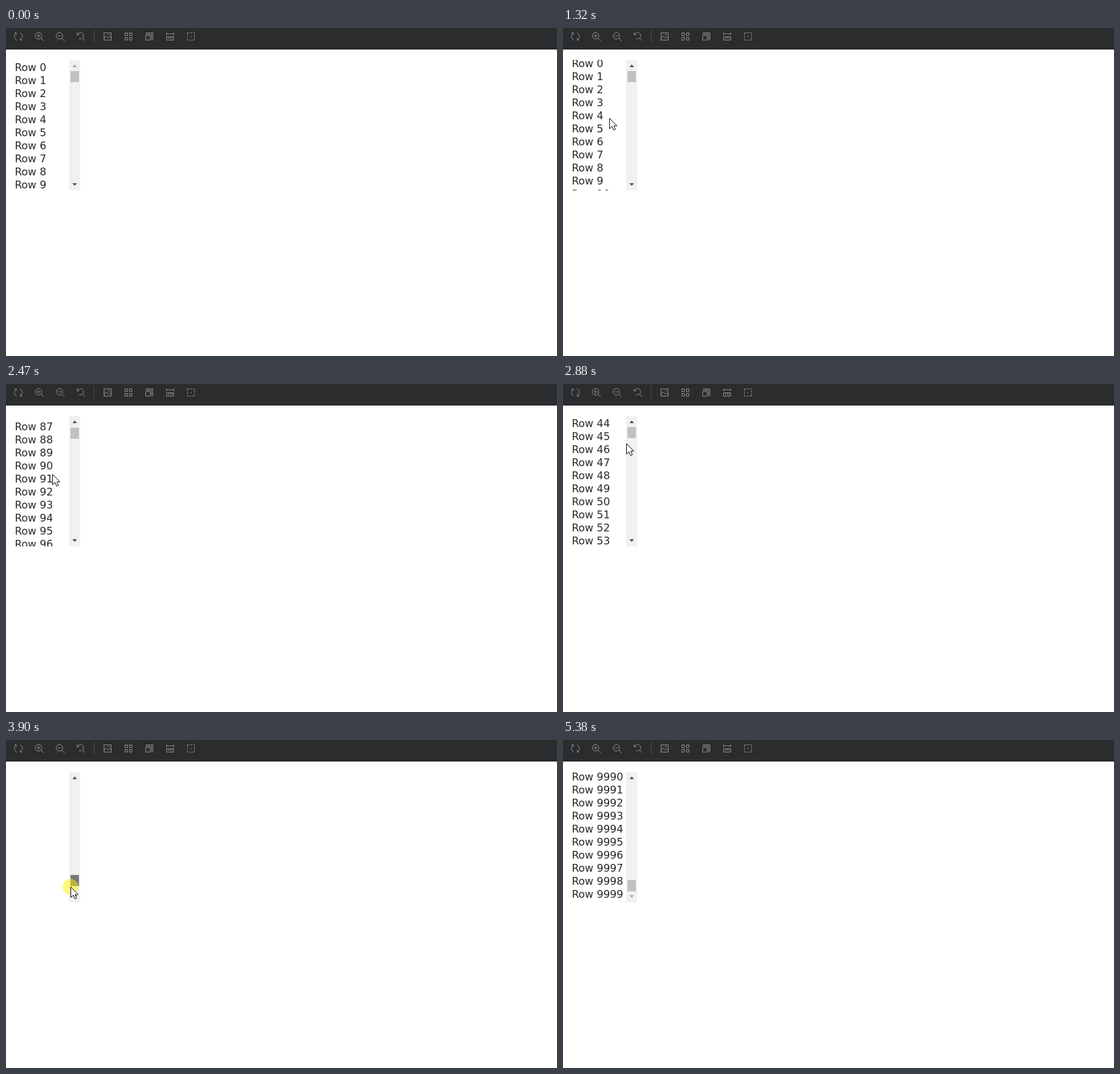
Animation, 846 px wide and 503 px high, one loop 6510 ms. Source, as an HTML page:

```html
<!DOCTYPE html>
<html lang="en">
<head>
<meta charset="utf-8">
<title>Virtual list</title>
<style>
  html, body { margin: 0; width: 100%; height: 100%; overflow: hidden; background: #fff; }
  svg { display: block; }
  #rows { font: 16px "DejaVu Sans", Verdana, sans-serif; fill: #2a2a2a; }
  #icons { fill: none; stroke: #8b8c8e; stroke-width: 1; }
</style>
</head>
<body>
<svg width="846" height="503" viewBox="0 0 846 503">
  <clipPath id="view"><rect x="8" y="49" width="89" height="200"/></clipPath>

  <rect width="846" height="33" fill="#2b2c2e"/>
  <path d="M0 32.500H846" stroke="#202123"/>
  <path d="M135.500 3V22" stroke="#4b4c4e"/>
  <g id="icons">
    <g transform="translate(19 13)">
      <path d="M-2.500 5.500A6 6 0 0 1 -3.500 -5M2.500 -5.500A6 6 0 0 1 3.500 5"/>
      <path d="M-6 -5.500H-3V-2.500M6 5.500H3V2.500"/>
    </g>
    <g transform="translate(51 13)">
      <circle cx="-1" cy="-1" r="5"/><path d="M2.500 2.500L7 7M-3.500 -1H1.500M-1 -3.500V1.500"/>
    </g>
    <g transform="translate(83 13)">
      <circle cx="-1" cy="-1" r="5"/><path d="M2.500 2.500L7 7M-3.500 -1H1.500"/>
    </g>
    <g transform="translate(115 13)">
      <path d="M-5 -3A4.800 4.800 0 1 1 -3 3M2.500 2.500L6.500 6.500M-6 -6V-2.500H-2.500"/>
    </g>
    <g transform="translate(156 13)">
      <rect x="-5.500" y="-5.500" width="11" height="11"/>
      <path d="M-5.500 3L-2 -1L1 2.500L3 .5L5.500 3"/><circle cx="2" cy="-2.500" r=".7"/>
    </g>
    <g transform="translate(188 13)">
      <path d="M-5.500 -5.500h4v4h-4zM1.500 -5.500h4v4h-4zM-5.500 1.500h4v4h-4zM1.500 1.500h4v4h-4z"/>
    </g>
    <g transform="translate(220 13)">
      <path d="M-5.500 -1.500h7v7h-7zM-5.500 -3.500H3.500V5.500M-5.500 -5.500H5.500V5.500"/>
    </g>
    <g transform="translate(252 13)">
      <path d="M-5.500 -6V-2M5.500 -6V-2M-5.500 -4H5.500M-5.500 .5h11v5h-11zM-2.500 .5v3M.5 .5v3M3 .5v3"/>
    </g>
    <g transform="translate(284 13)">
      <rect x="-5.500" y="-5.500" width="11" height="11" stroke-dasharray="3 1.500"/>
      <path d="M-1 0H1"/>
    </g>
  </g>

  <g id="rows" clip-path="url(#view)"></g>

  <rect x="97" y="49" width="17" height="200" fill="#f1f1f1"/>
  <path id="up" d="M102 60L105.500 56L109 60Z"/>
  <path id="down" d="M102 238L105.500 242L109 238Z"/>
  <rect id="thumb" x="99" width="13" height="17"/>

  <g id="cursor">
    <circle id="press" r="12" fill="#fff200" fill-opacity=".5"/>
    <path d="M.5 .5V16.500L4.300 13L6.800 18.600L9.500 17.400L7 12H11.800Z" fill="#fff" stroke="#111"/>
  </g>
</svg>
<script>
const LOOP = 6510, STEP = 64, ROW = 20, COUNT = 10000, MAX = 199804, TRAVEL = 149;
const $ = id => document.getElementById(id);

const linear = u => u;
const easeIn = power => u => u ** power;
const easeOut = power => u => 1 - (1 - u) ** power;
const flick = easeIn(3.65);

// Each motion runs through its points in a number of equal steps.
const motion = (start, steps, ease, ...points) => ({ start, steps, ease, points });

const scrolls = [
  motion(0, 1, linear, [0], [0]),
  motion(1320, 4, flick, [0], [880]),
  motion(1800, 4, flick, [880], [1740]),
  motion(2470, 4, flick, [1740], [880]),
  motion(3160, 6, easeOut(1.5), [880], [167640]),
  motion(3770, 9, easeOut(3), [167640], [199800]),
  motion(4370, 1, linear, [199800], [MAX])
];

const ENTER = 370, HOVER = 2960, PRESS = 3090, RELEASE = 4450, LEAVE = 5380;
const moves = [
  motion(ENTER, 10, linear, [700, 520], [220, 300], [7, 143]),
  motion(1060, 2, linear, [7, 143], [71, 138]),
  motion(2750, 6, easeOut(2), [71, 138], [105, 75]),
  motion(3160, 6, easeOut(8), [105, 75], [98, 200]),
  motion(3770, 9, easeOut(3), [98, 200], [100, 236]),
  motion(RELEASE, 2, linear, [100, 236], [100, 241]),
  motion(4980, 6, linear, [100, 241], [-70, 420], [300, 460], [518, 62])
];

const mix = (a, b, u) => a.map((v, i) => v + (b[i] - v) * u);

// Point at u on the Bezier curve through any number of control points
function bezier(points, u) {
  while (points.length > 1) points = points.slice(1).map((p, i) => mix(points[i], p, u));
  return points[0];
}

function sample(motions, t) {
  const m = motions.findLast(m => m.start <= t) ?? motions[0];
  const u = Math.min(1, (Math.floor((t - m.start) / STEP) + 1) / m.steps);
  return { point: bezier(m.points, m.ease(u)), from: m.points[0], done: u === 1 };
}

const rows = Array.from({ length: 11 }, () => {
  const row = document.createElementNS("http://www.w3.org/2000/svg", "text");
  row.setAttribute("x", 13.4);
  return $("rows").appendChild(row);
});

// Rows are rendered anew only when a scroll has come to rest.
function drawList(t) {
  const { point, from, done } = sample(scrolls, t);
  const scroll = Math.round(point[0]);
  const first = Math.floor((done ? scroll : from[0]) / ROW);
  rows.forEach((row, i) => {
    row.textContent = first + i < COUNT ? "Row " + (first + i) : "";
    row.setAttribute("y", 66 + (first + i) * ROW - scroll);
  });
  $("thumb").setAttribute("y", 66 + Math.floor(scroll / MAX * TRAVEL));
  $("up").setAttribute("fill", scroll > 0 ? "#505050" : "#a3a3a3");
  $("down").setAttribute("fill", scroll < MAX - ROW ? "#505050" : "#a3a3a3");
}

function drawCursor(t) {
  const [x, y] = sample(moves, t).point.map(Math.round);
  const pressed = t >= PRESS && t < RELEASE;
  const hovered = t >= HOVER && t < PRESS;
  $("cursor").style.display = t >= ENTER && t < LEAVE ? "" : "none";
  $("cursor").setAttribute("transform", `translate(${x} ${y})`);
  $("press").style.display = pressed ? "" : "none";
  $("thumb").setAttribute("fill", pressed ? "#787878" : hovered ? "#a8a8a8" : "#c1c1c1");
}

function frame() {
  const t = performance.now() % LOOP;
  drawList(t);
  drawCursor(t);
  requestAnimationFrame(frame);
}
frame();
</script>
</body>
</html>
```
